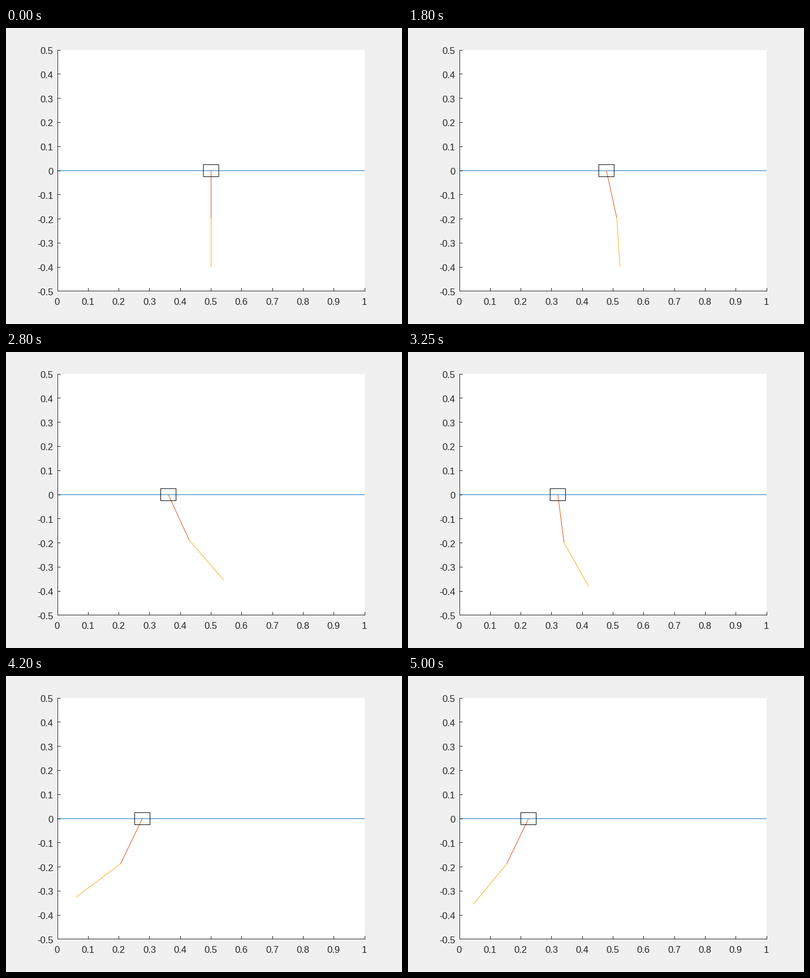
These frames come from a looping animation (700x525 px, 5050 ms). A matplotlib script:

```python
import numpy as np
import matplotlib.pyplot as plt
from matplotlib.animation import FuncAnimation
from matplotlib.patches import Rectangle

W, H, DPI = 700, 525, 100
FRAMES, STEP = 101, 50
PX = 72 / DPI               # one pixel in points
LEFT, RIGHT, TOP, BOTTOM = 91, 634, 39, 467
LINK = 0.2
CART_W = CART_H = 0.05
START = 1.35                # the cart rests until then
DARK = "#262626"

# key poses: time (s) -> cart position, upper and lower angle (rad)
REST = (0.5, 0, 0)
KEYS = {
    0.9: REST,
    START: REST,
    2.2: (0.439, 0.343, 0.224),
    2.8: (0.361, 0.345, 0.596),
    3.7: (0.2956, -0.177, -0.139),
    4.2: (0.2762, -0.362, -0.808),
    4.6: (0.2569, -0.47, -0.875),
    5.0: (0.2247, -0.362, -0.574),
}


def natural_spline(knots, values):
    """Smooth curve through the values, as a sum of |t - knot|^3 and a line."""
    n = len(knots)
    line_part = np.column_stack([np.ones(n), knots])
    cubes = np.abs(knots[:, None] - knots) ** 3
    system = np.block([[cubes, line_part], [line_part.T, np.zeros((2, 2))]])
    rhs = np.vstack([values, np.zeros((2, values.shape[1]))])
    weights = np.linalg.solve(system, rhs)
    return lambda t: np.r_[np.abs(t - knots) ** 3, 1, t] @ weights


pose = natural_spline(np.array(list(KEYS)), np.array(list(KEYS.values()), float))


def sx(x):
    return LEFT + (RIGHT - LEFT) * x


def sy(y):
    return TOP + (BOTTOM - TOP) * (0.5 - y)


plt.rcParams["font.family"] = "Liberation Sans"
fig = plt.figure(figsize=(W / DPI, H / DPI), dpi=DPI, facecolor="#f0f0f0")
ax = fig.add_axes([0, 0, 1, 1])
ax.set_xlim(0, W)
ax.set_ylim(H, 0)
ax.axis("off")


def line(xs, ys, color, z):
    return ax.plot(xs, ys, color=color, lw=PX, zorder=z, snap=False,
                   solid_capstyle="butt", solid_joinstyle="miter")[0]


def label(x, y, value, ha):
    ax.text(x, y, f"{value:g}", ha=ha, va="baseline", color=DARK,
            fontsize=16.67 * PX, zorder=5)


ax.add_patch(Rectangle((LEFT, TOP), RIGHT - LEFT, BOTTOM - TOP,
                       fc="white", ec="none", zorder=0))
line([LEFT, RIGHT], [sy(0)] * 2, "#0072bd", 1)

# axes, ticks and labels
base = BOTTOM - 0.5
line([LEFT, RIGHT + 1], [base, base], DARK, 5)
line([LEFT + 0.5] * 2, [TOP, BOTTOM], DARK, 5)
for k in range(11):
    x, y = k / 10, (k - 5) / 10
    cx = np.floor(sx(x)) + 0.5
    cy = min(np.floor(sy(y)) + 0.5, base)
    line([cx, cx], [base - 5.5, base], DARK, 5)
    line([LEFT, LEFT + 5.5], [cy, cy], DARK, 5)
    label(sx(x) - 0.5, 491, x, "center")
    label(LEFT - 7.5, sy(y) + 7, y, "right")

upper = line([], [], "#d95319", 2)
lower = line([], [], "#edb120", 3)
cart = Rectangle((0, sy(CART_H / 2)), sx(CART_W) - LEFT,
                 sy(0) - sy(CART_H), fill=False, ec="black", lw=PX,
                 zorder=4, snap=False)
ax.add_patch(cart)


def draw(n):
    x, a, b = pose(max(n * STEP / 1000, START))
    px = sx(x + LINK * np.cumsum([0, np.sin(a), np.sin(b)]))
    py = sy(-LINK * np.cumsum([0, np.cos(a), np.cos(b)]))
    upper.set_data(px[:2], py[:2])
    lower.set_data(px[1:], py[1:])
    cart.set_x(sx(x - CART_W / 2))
    return upper, lower, cart


anim = FuncAnimation(fig, draw, frames=FRAMES, interval=STEP, repeat=True,
                     init_func=lambda: draw(0))
plt.show()
```
